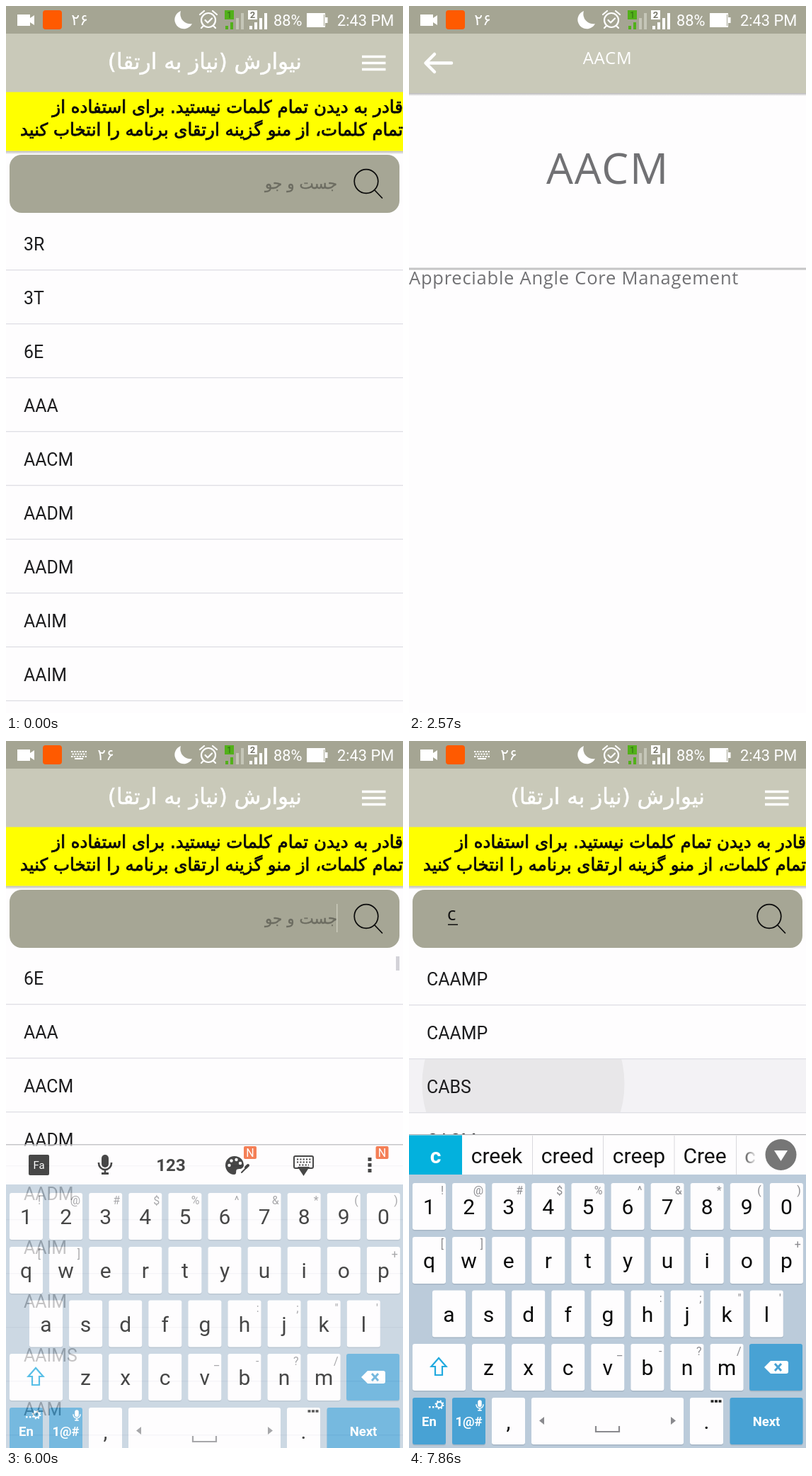
An HTML page for the animation above (8000 ms loop, 561 px wide and 998 px high).

```html
<!DOCTYPE html>
<html lang="fa">
<head>
<meta charset="utf-8">
<title>Acronym list</title>
<style>
html, body { margin: 0; width: 100%; height: 100%; overflow: hidden; background: #fefdfe; }
svg { display: block; width: 100vw; height: 100vh; }
text { font-family: Roboto, sans-serif; }
.fa { font-family: "DejaVu Sans", sans-serif; direction: rtl; }
.os { font-family: "Open Sans", sans-serif; letter-spacing: .03em; }
.row { font-size: 24.9px; fill: #1c1c1e; }
.mid { text-anchor: middle; }
.key { font-size: 30px; fill: #0a0a0a; text-anchor: middle; }
.hint { font-size: 16px; fill: #8b8b8f; text-anchor: end; }
.cap { font-size: 18.5px; font-weight: 700; fill: #fff; text-anchor: middle; }
.word { font-size: 30px; fill: #111; text-anchor: middle; }
.line { fill: none; stroke-linecap: round; stroke-linejoin: round; }

.anim { animation: 8s step-end infinite; }
#scroll { animation-name: scroll; }
#thumb { animation-name: thumb; }
#press1 { animation-name: press1; }
#press1 circle { animation-name: grow; }
#press2 { animation-name: press2; }
#listA, #hint { animation-name: beforeTyping; }
#listB, #typed { animation-name: afterTyping; }
#detail { animation-name: detail; }
#caret1 { animation-name: caret1; }
#caret2 { animation-name: caret2; }
#keyboard { animation-name: keyboard; }
#tools { animation-name: tools; }
#words { animation-name: words; }
#imeIcon { animation-name: imeIcon; }
#count { animation-name: count; }
.hit { animation: hit 8s step-end infinite; }

@keyframes scroll {
  0% { transform: translateY(0); }
  14.25% { transform: translateY(-34px); }
  16.125% { transform: translateY(-98px); }
  17.875% { transform: translateY(-136px); }
  19.625% { transform: translateY(-149px); }
  21.375%, 100% { transform: translateY(-153px); }
}
@keyframes thumb {
  0% { opacity: 0; } 14.25% { opacity: 1; } 25% { opacity: .6; } 26.75% { opacity: .2; }
  28.625% { opacity: 0; } 66.125% { opacity: 1; } 80.375%, 100% { opacity: 0; }
}
@keyframes press1 { 0% { opacity: 0; } 25% { opacity: 1; } 30.375%, 100% { opacity: 0; } }
@keyframes grow { 0% { r: 110px; } 26.75% { r: 215px; } 28.625%, 100% { r: 320px; } }
@keyframes press2 { 0% { opacity: 0; } 98.25%, 100% { opacity: 1; } }
@keyframes beforeTyping { 0% { opacity: 1; } 87.5%, 100% { opacity: 0; } }
@keyframes afterTyping { 0% { opacity: 0; } 87.5%, 100% { opacity: 1; } }
@keyframes detail {
  0% { opacity: 0; transform: translateY(80px); }
  28.625% { opacity: .6; transform: translateY(30px); }
  30.375% { opacity: 1; transform: translateY(3px); }
  32.125% { opacity: 1; transform: translateY(0); }
  66.125% { opacity: .5; transform: translateY(22px); }
  67.875%, 100% { opacity: 0; transform: translateY(80px); }
}
@keyframes caret1 { 0% { opacity: 0; } 75% { opacity: 1; } 80.375%, 100% { opacity: 0; } }
@keyframes caret2 { 0% { opacity: 0; } 87.5% { opacity: 1; } 94.625%, 100% { opacity: 0; } }
@keyframes keyboard {
  0% { opacity: 0; transform: translateY(44px); }
  75% { opacity: .75; transform: translateY(14px); }
  76.75%, 100% { opacity: 1; transform: translateY(0); }
}
@keyframes tools { 0% { opacity: 1; } 89.25%, 100% { opacity: 0; } }
@keyframes words { 0% { opacity: 0; } 89.25%, 100% { opacity: 1; } }
@keyframes imeIcon { 0% { opacity: 0; } 75%, 100% { opacity: 1; } }
@keyframes count { 0% { transform: translateX(0); } 75%, 100% { transform: translateX(37px); } }
@keyframes hit { 0% { fill: #fefdfe; } 85.75% { fill: #d3dbe2; } 87.5%, 100% { fill: #fefdfe; } }
</style>
</head>
<body>
<svg viewBox="0 0 561 998" preserveAspectRatio="none">
  <defs>
    <linearGradient id="shade" x2="0" y2="1">
      <stop offset="0" stop-color="#000" stop-opacity=".28"/>
      <stop offset="1" stop-color="#000" stop-opacity="0"/>
    </linearGradient>
    <linearGradient id="fade">
      <stop offset="0" stop-color="#fefdfe" stop-opacity="0"/>
      <stop offset="1" stop-color="#fefdfe"/>
    </linearGradient>
    <clipPath id="clip1"><rect y="448" width="561" height="75"/></clipPath>
    <clipPath id="clip2"><rect y="449" width="561" height="75"/></clipPath>
    <g id="mic">
      <rect x="-5" y="-14" width="10" height="18" rx="5"/>
      <path d="M-9-3v1a9 9 0 0 0 18 0v-1M0 8v5" fill="none" stroke="currentColor" stroke-width="2.6"/>
      <rect x="-5" y="11" width="10" height="3"/>
    </g>
    <g id="badge">
      <rect x="-9" y="-9" width="18" height="18" rx="2" fill="#f0541e"/>
      <text class="mid" y="6" font-size="16" fill="#fff">N</text>
    </g>
  </defs>

  <rect width="561" height="998" fill="#fefdfe"/>

  <!-- word list -->
  <g id="listA" class="anim">
    <g id="press1" class="anim" clip-path="url(#clip1)">
      <rect y="448" width="561" height="75" fill="#f3f2f5"/>
      <circle class="anim" cx="225" cy="489" r="215" fill="#e8e8e9"/>
    </g>
    <g id="scroll" class="anim"></g>
    <rect id="thumb" class="anim" x="551" y="304" width="5" height="20" fill="#d3d2d8"/>
  </g>
  <g id="listB" class="anim">
    <g id="press2" class="anim" clip-path="url(#clip2)">
      <rect y="449" width="561" height="75" fill="#f3f2f5"/>
      <circle cx="161.500" cy="484" r="143" fill="#e8e7e9"/>
    </g>
    <g id="found"></g>
  </g>

  <!-- top of the list page -->
  <rect width="561" height="297" fill="#fefdfe"/>
  <rect width="561" height="39" fill="#a5a593"/>
  <rect y="39" width="561" height="83" fill="#c9c9b9"/>
  <text class="fa" x="418" y="89" font-size="31" fill="#fff" stroke="#fff" stroke-width=".5">نیوارش (نیاز به ارتقا)</text>
  <path d="M503 71.500h33.500M503 80.500h33.500M503 89.500h33.500" stroke="#fff" stroke-width="3.500"/>
  <rect y="204.500" width="561" height="5" fill="url(#shade)"/>
  <rect y="121.500" width="561" height="83" fill="#ff0"/>
  <g font-size="24.500" fill="#0a0a0a" stroke="#0a0a0a" stroke-width=".8">
    <text class="fa" x="561" y="151">قادر به دیدن تمام کلمات نیستید. برای استفاده از</text>
    <text class="fa" x="561" y="183">تمام کلمات، از منو گزینه ارتقای برنامه را انتخاب کنید</text>
  </g>
  <rect x="5" y="210" width="551" height="82" rx="17" fill="#a6a695"/>
  <g class="line" stroke="#0a0a0a" stroke-width="1.700">
    <circle cx="509" cy="247.500" r="16.800"/><path d="M521 260l10.500 11"/>
  </g>
  <text id="hint" class="fa anim" x="468" y="258" font-size="21.500" fill="#6c6c61" stroke="#6c6c61" stroke-width=".4">جست و جو</text>
  <rect id="caret1" class="anim" x="467" y="230" width="1.500" height="40" fill="#c9c9ba"/>
  <g id="typed" class="anim">
    <text class="os" x="54" y="253" font-size="26" fill="#111">c</text>
    <rect x="55" y="258.500" width="14" height="1.500" fill="#111"/>
    <rect id="caret2" class="anim" x="69" y="231" width="1.500" height="38" fill="#c9c9ba"/>
  </g>

  <!-- word page -->
  <g id="detail" class="anim">
    <rect width="561" height="998" fill="#fefdfe"/>
    <rect width="561" height="39" fill="#a5a593"/>
    <rect y="123" width="561" height="4" fill="url(#shade)"/>
    <rect y="39" width="561" height="84" fill="#c9c9b9"/>
    <path class="line" d="M60 80.500H24M36 68L23.500 80.500L36 93" stroke="#fff" stroke-width="4.500"/>
    <text class="os mid" x="280.500" y="82" font-size="24" fill="#fff">AACM</text>
    <text class="os mid" x="281" y="251" font-size="60" fill="#717174">AACM</text>
    <rect y="369.500" width="561" height="3" fill="#c5c5c6"/>
    <text class="os" x="0" y="393" font-size="25.500" fill="#717174">Appreciable Angle Core Management</text>
  </g>

  <!-- status bar -->
  <g fill="#fff">
    <path d="M16 12h18v5l6-4v14l-6-4v5H16z"/>
    <rect x="52" y="6" width="27" height="27" rx="4" fill="#ff5a00"/>
    <g id="imeIcon" class="anim">
      <path d="M92 15h22M93.500 18.500h20M92 22h22" fill="none" stroke="#fff" stroke-width="2.200" stroke-dasharray="2.400 1.500"/>
      <rect x="97" y="24" width="12" height="2"/>
    </g>
    <text id="count" class="fa anim" x="116" y="27" font-size="22">۲۶</text>
    <path d="M247 7A13 13 0 1 0 263 25A14 14 0 0 1 247 7z"/>
    <g class="line" stroke="#fff" stroke-width="2.200">
      <circle cx="286" cy="20" r="10"/>
      <path d="M274 12l6-5M298 12l-6-5M279 28l-3 3M293 28l3 3M281.500 20l3.500 3.500l6-6"/>
    </g>
    <g fill="#52b01a">
      <rect x="309" y="6" width="13" height="13"/>
      <rect x="310" y="28" width="4" height="5"/><rect x="317" y="23" width="4" height="10"/>
    </g>
    <path d="M325 17h4v16h-4zM332 10h4v23h-4z" fill="#c5c6b8"/>
    <text class="mid" x="315.500" y="17" font-size="12" fill="#2f6b12">1</text>
    <rect x="342" y="6" width="13" height="13"/>
    <path d="M344 28h4v5h-4zM351 23h4v10h-4zM358 17h4v16h-4zM365 10h4v23h-4z"/>
    <text class="mid" x="348.500" y="17" font-size="13" font-weight="700" fill="#77776a">2</text>
    <text x="378" y="28" font-size="21.800">88%</text>
    <path d="M425 10h26v6h3.500v8H451v6h-26z"/>
    <path d="M449.500 12v16" stroke="#a5a593"/>
    <text x="468" y="28" font-size="21.800">2:43 PM</text>
  </g>

  <!-- on-screen keyboard -->
  <g id="keyboard" class="anim">
    <rect y="555" width="561" height="60" fill="#fefdfe"/>
    <rect y="555" width="561" height="1.500" fill="#b3b3b7"/>
    <rect y="612" width="561" height="386" fill="#bbcbda"/>
    <g id="tools" class="anim" fill="#0a0a0a" color="#0a0a0a">
      <rect x="32" y="570" width="29" height="29" rx="2"/>
      <text class="mid" x="46.500" y="590" font-size="15" fill="#fff">Fa</text>
      <use href="#mic" x="140" y="584"/>
      <text class="mid" x="233" y="593" font-size="24" font-weight="700">123</text>
      <path d="M323 572c-8 0-13 6-13 13s6 13 12 13c5 0 2-5 4-7s9 1 10-6c0-8-6-13-13-13z"/>
      <g fill="#fefdfe">
        <circle cx="315.500" cy="585" r="2.200"/><circle cx="318.500" cy="578.500" r="2.200"/>
        <circle cx="325.500" cy="577" r="2.200"/><circle cx="331" cy="582" r="2.200"/>
      </g>
      <path class="line" d="M333 595l7-8" stroke="#fefdfe" stroke-width="6"/>
      <path class="line" d="M333 595l6-6" stroke="#0a0a0a" stroke-width="2"/>
      <path class="line" d="M339 588l3-3" stroke="#0a0a0a" stroke-width="4"/>
      <rect x="407" y="572" width="27" height="17" rx="2" fill="none" stroke="#0a0a0a" stroke-width="2"/>
      <path d="M411 576.500h20M411 580.500h20M414 584.500h14" stroke="#0a0a0a" stroke-width="2.200" stroke-dasharray="2.200 2.100"/>
      <path d="M412 587h17l-8.500 13z"/>
      <path d="M511.500 574h5v5h-5zM511.500 582h5v5h-5zM511.500 590h5v5h-5z"/>
      <use href="#badge" x="345" y="567"/><use href="#badge" x="531.500" y="567"/>
    </g>
    <g id="words" class="anim">
      <rect y="556.500" width="561" height="55.500" fill="#fefdfe"/>
      <rect y="556.500" width="75" height="55.500" fill="#03b1dd"/>
      <path d="M174.500 557v55M274.500 557v55M375 557v55M462.500 557v55" stroke="#d9d9dd"/>
      <text class="word" x="37.500" y="596" style="fill:#fff;font-weight:700">c</text>
      <text class="word" x="124" y="596">creek</text>
      <text class="word" x="224" y="596">creed</text>
      <text class="word" x="325" y="596">creep</text>
      <text class="word" x="418" y="596">Cree</text>
      <text class="word" x="482" y="596">c</text>
      <rect x="466" y="557" width="26" height="55" fill="url(#fade)"/>
      <rect x="492" y="557" width="69" height="55" fill="#fefdfe"/>
      <circle cx="525.500" cy="584" r="22" fill="#767676"/>
      <path d="M516 578h19l-9.500 15z" fill="#fff"/>
    </g>
    <g id="keys"></g>
    <path d="M42 871l-10.500 12h5.500v12h10v-12h5.500z" fill="none" stroke="#22aadf" stroke-width="2.200"/>
    <path d="M502 884l9-9h22q3 0 3 3v12q0 3-3 3h-22z" fill="#fff"/>
    <path d="M517 879l9 10M526 879l-9 10" stroke="#48a2d4" stroke-width="3"/>
    <g fill="#fff" color="#fff">
      <path d="M28 939h2.500v2.500H28zM33 939h2.500v2.500H33z"/>
      <circle cx="43" cy="937" r="4" fill="none" stroke="#fff" stroke-width="2"/>
      <circle cx="43" cy="937" r="5.500" fill="none" stroke="#fff" stroke-width="2" stroke-dasharray="2 2.320"/>
      <use href="#mic" transform="translate(100 938) scale(.55)"/>
    </g>
    <path d="M191 954v11l-7-5.500zM370 954v11l7-5.500z" fill="#8a8a8e"/>
    <path d="M264 967v8h33v-8" fill="none" stroke="#8a8a8e" stroke-width="2.200"/>
    <path d="M426.500 932h4M432 932h4M437.500 932h4" stroke="#222" stroke-width="3.500"/>
  </g>
</svg>
<script>
const NS = "http://www.w3.org/2000/svg";
const byId = id => document.getElementById(id);

function add(parent, tag, attrs, label) {
  const el = document.createElementNS(NS, tag);
  for (const name in attrs) el.setAttribute(name, attrs[name]);
  if (label) el.textContent = label;
  parent.append(el);
  return el;
}

function fillList(id, words) {
  words.split(" ").forEach((word, i) => {
    const y = 297 + 76 * i;
    add(byId(id), "text", { class: "row", x: 25, y: y + 47.5 }, word);
    add(byId(id), "rect", { x: 0, y: y + 75, width: 561, height: 1.3, fill: "#dfdfe5" });
  });
}
fillList("scroll", "3R 3T 6E AAA AACM AADM AADM AAIM AAIM AAIMS AAM AAMA");
fillList("found", "CAAMP CAAMP CABS CACM");

const keys = byId("keys");
function key(x, y, w, label, { cls = "key", fill = "#fefdfe", hint = "", dy = 44 } = {}) {
  add(keys, "rect", { x, y: y + 1.5, width: w, height: 66, rx: 3, fill: "#a6b6c5" });
  const face = add(keys, "rect", { x, y, width: w, height: 66, rx: 3, fill });
  if (label === "c") face.setAttribute("class", "hit");
  if (label) add(keys, "text", { class: cls, x: x + w / 2, y: y + dy }, label);
  if (hint.trim()) add(keys, "text", { class: "hint", x: x + w - 3, y: y + 16 }, hint);
}

[
  ["1234567890", 5, 624, "!@#$%^&*()"],
  ["qwertyuiop", 5, 700, "[]       +"],
  ["asdfghjkl", 33, 775.5, "     :;\"'"],
  ["zxcvbnm", 89, 851, "   _-?/"]
].forEach(([chars, x, y, hints]) => {
  [...chars].forEach((ch, i) => key(x + 56.1 * i, y, 47, ch, { hint: hints[i] || "" }));
});

const blue = { cls: "cap", fill: "#48a2d4", dy: 40 };
key(5, 851, 75);
key(481, 851, 75, "", blue);
key(5, 927, 47, "En", blue);
key(61, 927, 47, "1@#", blue);
key(117, 927, 47, ",");
key(173, 927, 215);
key(397, 927, 47, ".");
key(453.5, 927, 103, "Next", blue);
</script>
</body>
</html>
```
